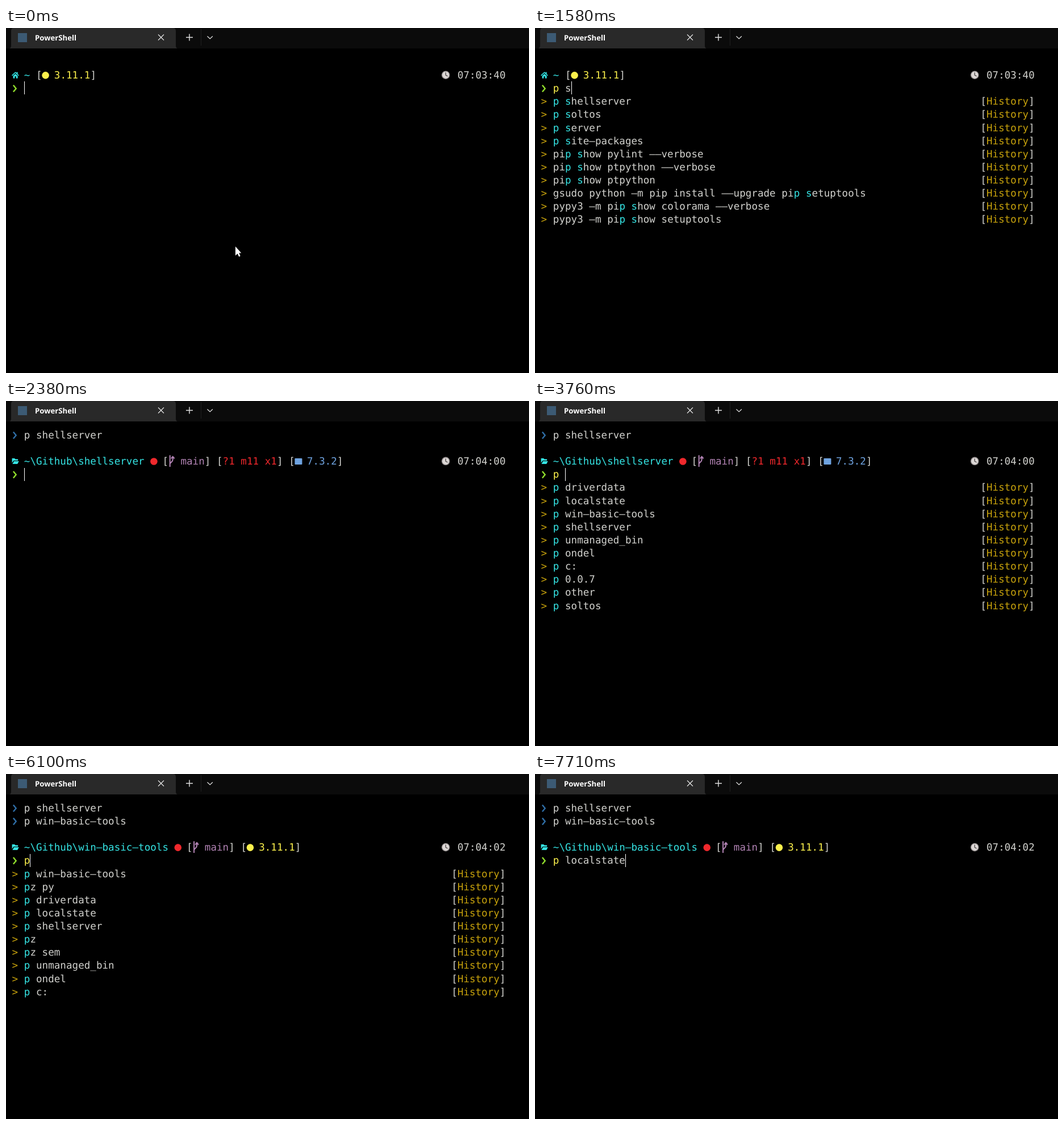
Animation of 921 by 608 pixels, one loop 8000 ms. Source, as an HTML page:

```html
<!DOCTYPE html>
<html lang="en">
<head>
<meta charset="utf-8">
<title>Terminal history completion</title>
<style>
  html, body { margin: 0; width: 100%; height: 100%; overflow: hidden; background: #000; }
  svg { display: block; width: 921px; height: 608px; }
  text { white-space: pre; text-rendering: geometricPrecision; }
  #screen text { font: 17.6px "DejaVu Sans Mono", "Noto Sans Mono", monospace; }
  .title { font: 700 13.2px "Open Sans", "Noto Sans", sans-serif; }
</style>
</head>
<body>
<svg viewBox="0 0 921 608">
  <rect width="921" height="608"/>
  <rect width="921" height="36" fill="#0b0b0b"/>
  <path d="M5 36q4 0 4-5V5q0-5 5-5H294q5 0 5 5V31q0 5 4 5z" fill="#292929"/>
  <rect x="21" y="9" width="16" height="16" fill="#3c5a74"/>
  <text class="title" x="51" y="22" fill="#fff">PowerShell</text>
  <g fill="none" stroke="#e4e4e4" stroke-width="1.2">
    <path d="M268 11.500l10 10m0-10l-10 10"/>
    <path d="M317 16.500h12m-6-6v12" stroke-width="1.400"/>
    <path d="M354.500 14.500l4.700 4.500 4.700-4.500"/>
    <path d="M343.500 2v29" stroke="#1f1f1f" stroke-width="1"/>
  </g>
  <g id="screen"></g>
  <path id="pointer" d="M404 385v16l3.800-3.300 2.400 5.300 2.500-1.100-2.400-5.300h4z" fill="#fff"/>
</svg>
<script>
const LOOP = 8000, CELL = 10.6, LINE = 23.13, TOP = 48.2;
const COLOR = {
  text: '#d2d2ce', cyan: '#35e4e4', yellow: '#fbf04c', gold: '#c7a20c', green: '#8fdc2c',
  blue: '#2f6ea6', red: '#f0282c', purple: '#b283b4', azure: '#6fa3e0'
};

const HISTORY = [
  'pz py', 'p driverdata', 'p localstate', 'p win-basic-tools', 'p shellserver', 'pz', 'pz sem',
  'p unmanaged_bin', 'p ondel', 'p c:', 'p 0.0.7', 'p other', 'p soltos', 'p server', 'p site-packages',
  'pip show pylint --verbose', 'pip show ptpython --verbose', 'pip show ptpython',
  'gsudo python -m pip install --upgrade pip setuptools',
  'pypy3 -m pip show colorama --verbose', 'pypy3 -m pip show setuptools',
  'pip show colorama', 'pip show setuptools', 'pip show pip', 'pip show pip --verbose',
  'p lib', 'p logs', 'pip list', 'pip list --user', 'pypy3 -m pip list', 'python -m pip list',
  'pypy -m pip list --user', 'p links', 'pip list --outdated'
];
const LONG = 'pip install --upgrade setuptools wheel colorama pylint ptpython pip -q';
const WIN = 'p win-basic-tools';

const SCENES = [
  { past: [], row: 1, clock: '07:03:40', python: true, history: [LONG, ...HISTORY] },
  { past: ['p shellserver'], row: 2, clock: '07:04:00', folder: 'shellserver',
    status: '?1 m11 x1', history: HISTORY },
  { past: ['p shellserver', WIN], row: 3, clock: '07:04:02', folder: 'win-basic-tools',
    python: true, history: [WIN, ...HISTORY.filter(h => h !== WIN)] }
];

// [start, scene, input, state]
const STEPS = [
  [0, 0, ''], [650, 0, '', 'blink'], [1170, 0, ''], [1260, 0, 'p'], [1450, 0, 'p '], [1580, 0, 'p s'],
  [1780, 0, 'p sh'], [1880, 0, 'p she'], [1980, 0, 'p shel'], [2120, 0, 'p shell'],
  [2180, 0, 'p shellserver', 'accepted'],
  [2380, 1, ''], [2990, 1, '', 'blink'], [3520, 1, ''], [3640, 1, 'p'], [3760, 1, 'p '],
  [3910, 1, 'p w'], [4050, 1, 'p wi'], [4440, 1, 'p win'], [4640, 1, WIN, 'accepted'],
  [5100, 2, ''], [5700, 2, '', 'blink'], [6100, 2, 'p'], [6300, 2, 'p '], [6580, 2, 'p l'],
  [6750, 2, 'p lo'], [6830, 2, 'p loc'], [6900, 2, 'p loca'], [6980, 2, 'p local'],
  [7250, 2, 'p locals'], [7440, 2, 'p localst'], [7710, 2, 'p localstate', 'accepted']
];

const colX = col => CELL * (col + 1);
const midY = row => TOP + LINE * row + 11.5;
// The terminal face has wide hyphens, so an en dash stands in for them.
const glyphs = s => s.replace(/-/g, '–').replace(/>/g, '&gt;');

function put(col, row, s, color = 'text') {
  return s && `<text x="${colX(col)}" y="${midY(row) + 6.2}" fill="${COLOR[color]}">${glyphs(s)}</text>`;
}
function icon(col, row, body, color) {
  const c = COLOR[color];
  return `<g transform="translate(${colX(col)} ${midY(row)})" fill="${c}" stroke="${c}" stroke-width="0">${body}</g>`;
}

const ICONS = {
  home: '<path d="M-.5 .5L6-5.500l2 1.800V-5h2v3.300L12.300 .5l-1 1.100L6-3.500 .7 1.600zM2 1.700L6-2l4 3.700V6H7.200V2.500H4.800V6H2z"/>',
  folder: '<path d="M0 3V-5h4.500l1.500 1.500h4.500V-1H3zM.7 5l3-5h8.500l-2.600 5z"/>',
  disc: '<circle cx="6" cy=".5" r="6.300"/>',
  square: '<rect x="-.3" y="-5" width="13" height="11" rx="1"/>',
  chevron: '<path d="M2.300-5.200l4.800 5.900L2.300 6.600" fill="none" stroke-width="2.400"/>',
  branch: '<path d="M2.500-10.500V10M2.700 4.500C4 1 7.500 2 7.500-3V-7M4.500-4.500l3-3.500 3 3.500" fill="none" stroke-width="2"/>',
  clock: '<circle cx="0" cy="0" r="6.700" fill="#ddd8d6" stroke="#8d8888" stroke-width="1.300"/>' +
    '<path d="M0-4.500V.3L3.300 2" fill="none" stroke="#4a4646" stroke-width="1.300"/>'
};

function prompt(scene) {
  const { row } = scene;
  const path = scene.folder ? '~\\Github\\' + scene.folder : '~';
  let col = 2 + path.length + 1;
  let out = icon(0, row, ICONS[scene.folder ? 'folder' : 'home'], 'cyan') + put(2, row, path, 'cyan');
  const box = (width, inner) => {
    out += put(col, row, '[') + inner(col + 1) + put(col + 1 + width, row, ']');
    col += width + 3;
  };
  if (scene.folder) {
    out += icon(col, row, ICONS.disc, 'red');
    col += 2;
    box(6, c => icon(c, row, ICONS.branch, 'purple') + put(c + 2, row, 'main', 'purple'));
  }
  if (scene.status) box(scene.status.length, c => put(c, row, scene.status, 'red'));
  const [version, mark, color] = scene.python ? ['3.11.1', 'disc', 'yellow'] : ['7.3.2', 'square', 'azure'];
  box(version.length + 2, c => icon(c, row, ICONS[mark], color) + put(c + 2, row, version, color));
  return out + icon(72.05, row, ICONS.clock, 'text') + put(74, row, scene.clock);
}

function suggestions(scene, query) {
  return scene.history.filter(h => h.includes(query)).slice(0, 10).map((entry, i) => {
    const row = scene.row + 2 + i, at = entry.indexOf(query), end = at + query.length;
    return put(0, row, '>', 'gold') +
      put(2, row, entry.slice(0, at)) +
      put(2 + at, row, entry.slice(at, end), 'cyan') +
      put(2 + end, row, entry.slice(end)) +
      put(73, row, '[') + put(74, row, 'History', 'gold') + put(81, row, ']');
  }).join('');
}

function draw([, index, input, state]) {
  const scene = SCENES[index], row = scene.row + 1;
  let out = scene.past.map((cmd, i) => icon(0, i, ICONS.chevron, 'blue') + put(2, i, cmd)).join('');
  out += prompt(scene) + icon(0, row, ICONS.chevron, 'green');
  out += put(2, row, input.slice(0, 1), 'yellow') + put(4, row, input.slice(2));
  if (input && state !== 'accepted') out += suggestions(scene, input);
  if (state !== 'blink') {
    const x = Math.round(colX(2 + input.length)), y = Math.round(TOP + LINE * row);
    out += `<rect x="${x}" y="${y}" width="1" height="23" fill="#fff"/>`;
  }
  return out;
}

const screen = document.getElementById('screen');
const pointer = document.getElementById('pointer');
let shown;

function render(t) {
  const step = STEPS.findLast(s => s[0] <= t);
  if (step === shown) return;
  shown = step;
  screen.innerHTML = draw(step);
  pointer.style.display = t < 1260 ? '' : 'none';
}

const start = performance.now();
function tick() {
  render((performance.now() - start) % LOOP);
  requestAnimationFrame(tick);
}
tick();
</script>
</body>
</html>
```
